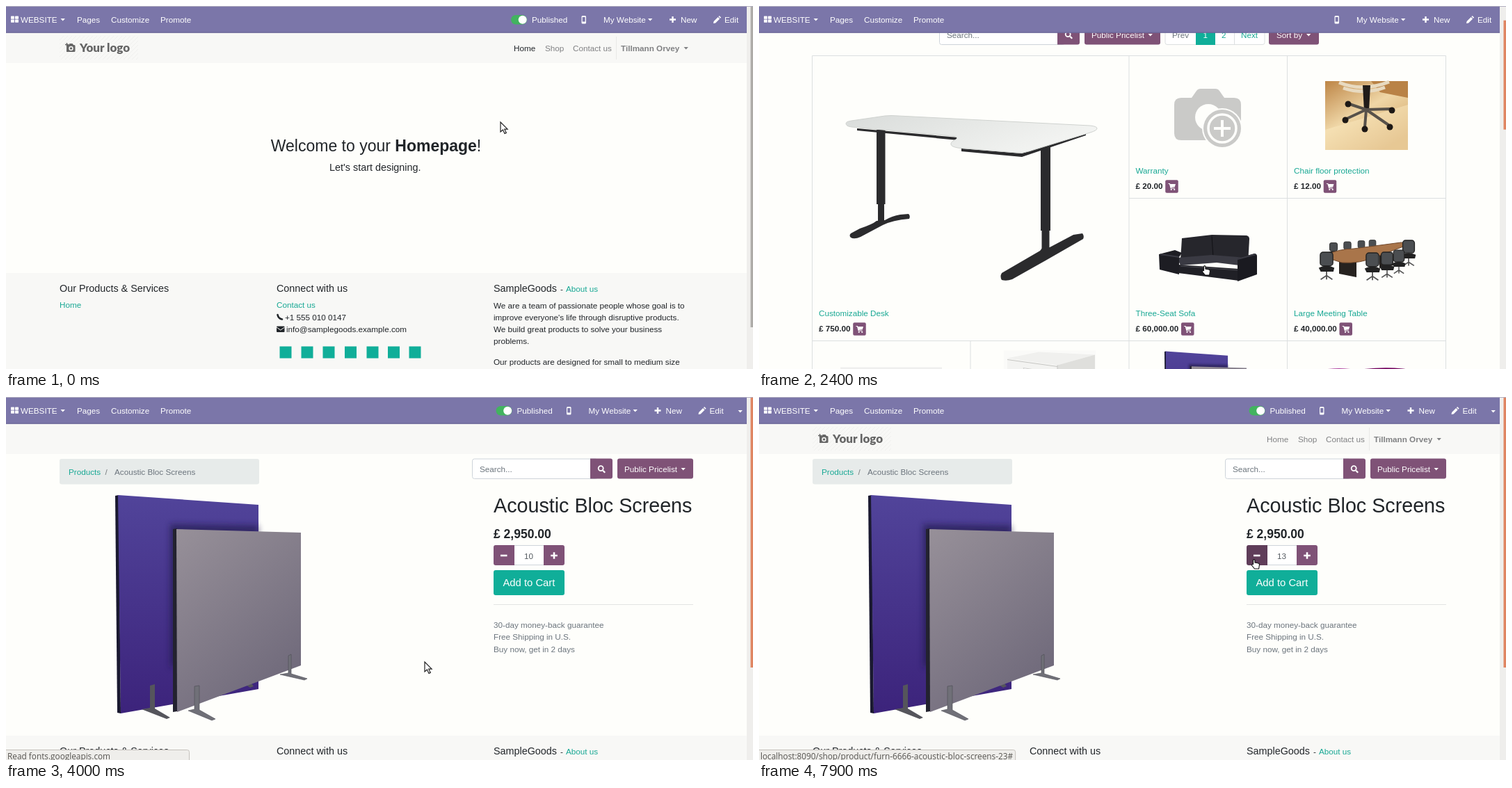
Animation, 1074 px wide and 522 px high, one loop 8000 ms. Source, as an HTML page:

```html
<!DOCTYPE html>
<html lang="en">
<head>
<meta charset="utf-8">
<title>Web shop tour</title>
<style>
html, body { margin: 0; width: 100%; height: 100%; overflow: hidden; background: #fefefb; }
svg { display: block; width: 1074px; height: 522px; }
text { font: 11.7px "Liberation Sans", Arial, sans-serif; white-space: pre; }
</style>
</head>
<body>
<svg id="stage" viewBox="0 0 1074 522"></svg>
<script>
const INK = '#212529', GRAY = '#777b7e', TEAL = '#10ae99', LINK = '#18a894', PLUM = '#7f5277', PALE = '#f8f8f6',
      PAPER = '#fefefb', LINE = '#dcdfe0', NAVY = '#7b76a9', DARK = '#2b2b2d';

// drawing helpers: each returns markup
const path = (d, fill, more = '') => `<path d="${d}" fill="${fill}" ${more}/>`;
const line = (d, stroke, w = 1, more = '') => path(d, 'none', `stroke="${stroke}" stroke-width="${w}" ${more}`);
const rect = (x, y, w, h, fill, r = 0, stroke = 'none') =>
  `<rect x="${x}" y="${y}" width="${w}" height="${h}" rx="${r}" fill="${fill}" stroke="${stroke}"/>`;
const dot = (x, y, r, fill, more = '') => `<circle cx="${x}" cy="${y}" r="${r}" fill="${fill}" ${more}/>`;
const text = (x, y, s, fill = INK, size = 11.7, more = '') =>
  `<text x="${x}" y="${y}" fill="${fill}" style="font-size:${size}px;${more}">${s}</text>`;
const bold = (x, y, s, fill = INK, size = 11.7) => text(x, y, s, fill, size, 'font-weight:bold');
const group = (id, inner, more = '') => `<g id="${id}" ${more}>${inner}</g>`;
const shift = (x, y, inner, k = 1) => `<g transform="translate(${x} ${y}) scale(${k})">${inner}</g>`;
const caret = (x, y, fill = '#fff') => path(`M${x} ${y}h6.4l-3.2 3.4z`, fill);
const plus = (x, y, r = 4.5, w = 2.4) => line(`M${x - r} ${y}h${2 * r}M${x} ${y - r}v${2 * r}`, '#fff', w);

const defs = `<defs>
  <linearGradient id="violet" x2="0" y2="1"><stop stop-color="#51449a"/><stop offset="1" stop-color="#3c237b"/></linearGradient>
  <linearGradient id="ash" x2=".6" y2="1"><stop stop-color="#979099"/><stop offset="1" stop-color="#706a7b"/></linearGradient>
  <linearGradient id="floor" x2=".7" y2="1"><stop stop-color="#bd8546"/><stop offset=".5" stop-color="#efd6a6"/><stop offset="1" stop-color="#d3a769"/></linearGradient>
  <linearGradient id="top" x2="1" y2=".4"><stop stop-color="#d9dcda"/><stop offset="1" stop-color="#f3f4f2"/></linearGradient>
  <pattern id="hatch" width="6" height="6" patternUnits="userSpaceOnUse"><path d="M-1 7L7-1" stroke="#f0f0ee"/></pattern>
  <filter id="soft"><feGaussianBlur stdDeviation="4"/></filter></defs>`;

// top bar
const tools =
  rect(827.5, 14, 6.5, 11.5, '#fff', 1.5) + rect(828.7, 16, 4, 6.5, NAVY) +
  text(859, 24, 'My Website', '#fff') + caret(923, 18) + plus(958.5, 19.5) + text(970, 24, 'New', '#fff') +
  path('M1017 25l.6-3 6-6 2.5 2.5-6 6zM1024.4 15.2l1.2-1.2 2.5 2.5-1.2 1.2z', '#fff') +
  text(1033, 24, 'Edit', '#fff') + caret(1074, 19);
const bar = rect(0, 0, 1065, 38.5, NAVY) + rect(0, 0, 1074, 1, '#b3b0c2') + rect(0, 37.5, 1065, 1.2, '#6a6598') +
  [[7, 14.5], [13, 14.5], [7, 19.5], [13, 19.5]].map(([x, y]) => rect(x, y, 5, 4.2, '#fff', .6)).join('') +
  text(21, 24, 'WEBSITE', '#fff') + caret(78.5, 18) + text(102, 24, 'Pages', '#fff') +
  text(151, 24, 'Customize', '#fff') + text(222, 24, 'Promote', '#fff') +
  `<svg width="1065" height="39">${group('tools', tools + group('live',
    rect(726, 13, 23, 13.5, '#42b35f', 6.7) + dot(742.7, 19.7, 6, '#fff') + text(756, 24, 'Published', '#fff')))}</svg>`;

const camera = path('M87 56h3l1.5-2h4l1.5 2h1q1.5 0 1.5 1.5v7q0 1.5-1.5 1.5h-11z', '#666') +
  dot(93.5, 61, 3.2, PALE) + dot(93.5, 61, 1.7, '#666') + line('M85 55.5h5M87.5 53v5', '#666', 1.3);
const header = (id, active) => {
  const item = (x, s) => text(x, 65, s, s === active ? INK : '#808183');
  return rect(0, 38, 1065, 44, PALE) + group(id,
    rect(77, 43, 113, 34, 'url(#hatch)') + camera +
    text(106, 66, 'Your logo', '#666', 17, 'font-family:Lato,sans-serif;font-weight:900') +
    line('M877.5 44v33', '#e9e9e7') +
    group(id + 'Menu', item(730, 'Home') + item(775, 'Shop') + item(815, 'Contact us') +
      bold(884, 65, 'Tillmann Orvey', '#808183') + caret(974.5, 59, '#808183')));
};

const footer = rect(0, 384, 1065, 330, PALE) +
  text(77, 411, 'Our Products &amp; Services', INK, 14.36) + text(77, 434, 'Home', LINK) +
  text(389, 411, 'Connect with us', INK, 14.36) + text(389, 434, 'Contact us', LINK) +
  line('M390.5 444q1 5.5 6.5 6.5', INK, 2.6, 'stroke-linecap="round"') + text(401, 452, '+1 555 010 0147') +
  rect(389, 460.5, 11.5, 8.5, INK, 1) + line('M389 462l5.7 4 5.8-4', PALE) +
  text(403, 469, 'info@samplegoods.example.com') +
  [402, 433, 464, 495.5, 527, 557.5, 588].map(x => rect(x - 8.5, 489.5, 17, 17, TEAL)).join('') +
  text(701, 411, 'SampleGoods', INK, 14.36) + text(797, 411, '-') + text(805, 411, 'About us', LINK) +
  ['We are a team of passionate people whose goal is to', 'improve everyone\'s life through disruptive products.',
   'We build great products to solve your business', 'problems.'].map((s, i) => text(701, 434.5 + i * 17.25, s)).join('') +
  text(701, 516, 'Our products are designed for small to medium size');

const home = header('homeNav', 'Home') +
  `<text x="532" y="209" text-anchor="middle" fill="${INK}" style="font-size:23px">Welcome to your <tspan font-weight="bold">Homepage</tspan>!</text>` +
  text(465, 237, 'Let\'s start designing.', INK, 14.4) + footer;

// search box with price list button, shared by two pages
const search = rect(259.5, 89, 180, 28.5, '#fff', 3, '#ced4da') + text(270, 107.5, 'Search...', '#6c757d') +
  path('M429 88.5h29q3 0 3 3v23q0 3-3 3h-29z', PLUM) +
  line('M447.2 105.7l3 3', '#fff', 2.2) + dot(444.2, 102.6, 3.5, 'none', 'stroke="#fff" stroke-width="1.8"') +
  rect(468, 88.5, 109, 29, PLUM, 3) + text(478, 107.5, 'Public Pricelist', '#fff') + caret(559.5, 102);

// pictures
const chair = (x, y, k = 1) => shift(x, y, line('M0 7v8M-6 18l6-4 6 4M0 14v4', '#555', 1.3) +
  rect(-6.5, -10, 13, 14, '#4b4e51', 3, '#222') + path('M-8 6q8-4 16 0l-1 4h-13z', '#222'), k);
const chairs = list => list.map(p => chair(...p)).join('');

const desk = path('M141 238l145 13v4l-145-14zM291 267l87 7 92-30v4l-92 31-87-8z', DARK) +
  path('M169 240h12.5v107h-1.5v26h-9v-26h-2zM405 265h14v120h-1.5v28h-11v-28h-1.500z', DARK) +
  path('M132 389l13-7q18-6 24-11l12-1q10-6 22-8l12-1q3 3 1 7-24 2-38 9l-32 17q-9 4-14 1-3-3 0-6z', DARK) +
  path('M349 446l55-32 4-5h10l34-18 13-2q3 4 1 8l-54 31-48 27q-8 3-15 1-3-5 0-10z', DARK) +
  path('M125 231q0-3 8-4l48-7q8-1 20 0l275 14q10 1 10 4t-10 6l-88 27q-8 3-18 2l-84-7q-11-2-10-6 0-3 7-6 5-4-5-5l-145-13q-8-1-8-5z', 'url(#top)', 'stroke="#cfd2cf"');

const warranty = path('M607 194h15l7-10q2-3 6-3h21q4 0 6 3l7 10h14q10 0 10 10v41q0 10-10 10h-76q-10 0-10-10v-41q0-10 10-10z', '#cacac8') +
  dot(646, 222, 19, PAPER) + dot(666, 238, 29, PAPER) + dot(666, 238, 27, '#cacac8') +
  dot(666, 238, 20, 'none', 'stroke="#fefefb" stroke-width="3.5"') + line('M654 238h24M666 226v24', PAPER, 4);

const mat = rect(814, 170, 119, 99, 'url(#floor)') + path('M814 240l119-36v65h-119z', '#fbe9c0', 'opacity=".5"') +
  path('M880 170h53v24l-40-8z', '#b98246') + line('M834 172q34 14 72-1M840 180q30 10 60-1', '#e8dac0', 5) +
  path('M868 176h11l-2 37h-7z', '#211c19') +
  line('M873 211l-28 13M873 211l-2 25M873 211l32 22M873 211l35-1M873 211l-24-8', '#57514a', 4) +
  [[843, 226], [871, 239], [907, 236], [910, 212], [847, 203]].map(([x, y]) => dot(x, y, 4.5, '#1d1815')).join('');

const sofa = path('M608 396l43-5 50 1q4 1 4 5l-2 36-97-6z', '#26262c') + line('M651 393l2 30', '#111115') +
  path('M601 424l50-4 7 11-52 4zM651 420l50 4-10 11-33-4z', '#3a3a43') +
  path('M603 434l87 6v17l-87-11z', '#202026') + line('M606 436l84 6', '#4a4a52') +
  path('M575 419l23-6 10 4-4 6v25l-28-7z', '#1d1d23') + line('M577 419l27 4', '#3a3a43', 2) +
  path('M688 425l24-7q4 0 4 4v26l-28 10z', '#1a1a20') + line('M688 426l26-7', '#3a3a43', 2);

const meeting = chairs([[826, 411, .85], [846, 409, .8], [866, 407, .75], [882, 406, .75]]) +
  path('M834 427h25v25l-25-5zM892 420h20v15l-20 4z', '#26221f') +
  path('M815 420q20-9 40-9l68-9q8 0 6 5l-40 15q-25 11-51 9l-22-7q-3-2-1-4z', '#a9754a', 'stroke="#6f482c"') +
  chairs([[816, 430, 1.4], [934, 412, 1.3], [920, 425, 1.2], [903, 429, 1.3], [882, 431, 1.4]]);

// the pictures below sit in rows three and four
const cubicle = rect(117, 254, 146, 96, '#efefee') + chairs([[183, 270, 1.1], [254, 295, 1.2]]) +
  path('M166 279l26-7 8 5-24 8zM200 277l22-5 20 9-17 8zM147 293l20-8 27 20-26 8z', '#a58a68') +
  path('M165 279l32-11v9l-26 10zM197 267l46 17v10l-46-16zM153 276l41 26v13l-41-26zM194 302l50-15v12l-50 16z', '#a9b0b3') +
  path('M147 293l21 20v4l-21-20zM150 297h3v34h-3zM170 313l24-4v35l-24-6zM200 320h3v22h-3zM241 306h3v28h-3z', '#fdfdfc') +
  path('M183 312l10 1v24l-10-3z', '#7f6650') + path('M195 311l44-12 5 7-26 9-4 8-15-1z', '#a58a68') +
  chairs([[132, 298, 1.4], [209, 319, 1.5]]);

const drawer = rect(352, 230, 132, 145, '#fafaf8') + path('M357 241l45-9 81 4-54 15z', '#f0f0ee') +
  path('M357 241l72 10v112l-72-17z', '#f3f3f1') + path('M429 251l54-15v109l-54 18z', '#dfdfdc') +
  line('M357 276l72 11M357 312l72 14M429 251v112M357 243l72 10', '#c6c6c3') +
  [[380, 255], [380, 291], [380, 326]].map(([x, y]) => path(`M${x} ${y}l26 4q-5 9-13 6-8-1-13-10z`, '#fff', 'stroke="#d0d0ce"')).join('') +
  rect(414, 329, 6, 5, '#444', 2) + [[366, 351], [425, 368], [476, 352]].map(([x, y]) => rect(x - 6.5, y - 5, 13, 11, DARK, 4)).join('');

const panels = path('M157 142l5-1 3 314-5-1z', '#1a1930') + path('M161 141l202 14v265l-198 35z', 'url(#violet)') +
  path('M236 183l127 2v14l-115 2v180l-12 10z', '#1c1744', 'opacity=".6" filter="url(#soft)"') +
  path('M207 415l7-2v35l22 13-5 2-36-14 12-2zM345 414l8-2 3 4-5 2z', '#55555c') +
  path('M240 190l6-1v263l-6 1z', '#23222f') + path('M245 190l179 5v191l-178 67z', 'url(#ash)') +
  path('M271 416l7-1v35l23 13-5 2-34-14 9-2zM406 372l4-2v28l23 7-4 2-35-8 12-2z', '#707078', 'stroke="#4b4b52" stroke-width=".6"');

const booth = path('M803 334l70-10 65 12-22 14-60 3z', '#ecece9') +
  path('M866 257q32-4 60-1 12 1 12 8l-20 6v37l-46-5z', '#740660') + path('M897 274l21 2v30l-21-4z', '#980a82') +
  path('M874 306l30-5 14 6v16l-10 3-34-2z', '#7c8175') + path('M874 304l30-4 13 6-22 8z', '#a2a695') +
  dot(888, 297, 4, '#e5c9c1') + dot(896, 298, 3.5, '#b8425b') +
  path('M918 268q14-6 20-3v72l-20 12z', '#8d0078') +
  path('M803 266q0-8 10-9 25-3 48 1 12 2 12 9v72q-3 9-14 11l-56-17z', '#93007e') +
  line('M850 349q5-30 2-76', '#7a0069', 2);

const standing = path('M119 489l46-5 96 4-42 12-51 3z', '#34353c') + path('M165 467l28-4v46l-28-6zM193 461l24 3v34l-24 7z', '#25262d') +
  line('M135 496v45M148 500v40M248 492v42M206 502v43', '#34353c', 3);
const cabinet = path('M362 446l21-6 106 7v99H348v-62l14-2z', '#2f2f30') + line('M362 449l126 4M362 470l126 2', '#151515', 2) +
  line('M372 458l90 2v9h-90z', '#48484a') + path('M374 482l72-4v22l-73 8z', '#e8e8e6') + path('M348 482l62-2v40l-62 3z', '#303032');
const oak = line('M588 486v60M700 484v60M637 490v40', '#333438', 4) +
  path('M575 482l43-9 99 6v4l-36 8h-20l-26-5-60 1z', '#c99f62', 'stroke="#9a743f" stroke-width=".8"');
const boss = path('M834 488l20 2q6 1 6 5l-14 2 8 25h-8q-12-24-12-34z', '#222') +
  path('M858 446q1-7 10-7 20-3 38 0 8 1 8 8l-7 50 4 25h-61l6-27z', '#29292a') +
  line('M868 452q20-5 38 0M866 470q20-4 42 0M860 496q22-5 48 1', '#404042');

// product cell caption; width of a price follows from its characters
const cart = (x, y) => rect(x, y, 18.5, 18.5, PLUM, 2) +
  line(`M${x + 4.2} ${y + 5.2}h2l1.8 6.5h5.5`, '#fff', 1.2) +
  path(`M${x + 6.7} ${y + 5.7}h8l-1.2 4.3-6 .8z`, '#fff') + dot(x + 8.5, y + 13.7, 1.1, '#fff') + dot(x + 13, y + 13.7, 1.1, '#fff');
const caption = (x, bottom, name, price) => {
  const w = [...price].reduce((sum, c) => sum + (/[\d£]/.test(c) ? .556 : .278), 0) * 11.7;
  return text(x, bottom - 35.5, name, LINK) + bold(x, bottom - 13.5, price) + cart(x + w + 3.7, bottom - 26.2);
};
const cols = [86, 313.5, 541.5, 769];

const shop = header('shopNav', 'Shop') + search +
  rect(584, 89, 143, 28.5, '#fff', 3, LINE) + rect(628, 88.5, 28, 29.5, TEAL) + line('M683.5 89v28', LINE) +
  text(594, 107.5, 'Prev', '#6c757d') + text(638.5, 107.5, '1', '#fff') + text(665, 107.5, '2', LINK) + text(693, 107.5, 'Next', LINK) +
  rect(733, 88.5, 72, 29, PLUM, 3) + text(744, 107.5, 'Sort by', '#fff') + caret(787, 102) +
  line('M76.5 133.5H987.5M532 338.5H987.5M76.5 543.5H987.5M76.5 749H987.5M76.5 133.5V954M987.5 133.5V954M304 543.5V954M532 133.5V954M759.5 133.5V954', LINE) +
  desk + warranty + mat + sofa + meeting + shift(513.6, 496.2, panels, .442) +
  shift(0, 327.5, cubicle + drawer + booth + standing + cabinet + oak + boss) +
  caption(cols[2], 338.5, 'Warranty', '£ 20.00') + caption(cols[3], 338.5, 'Chair floor protection', '£ 12.00') +
  caption(cols[0], 543.5, 'Customizable Desk', '£ 750.00') + caption(cols[2], 543.5, 'Three-Seat Sofa', '£ 60,000.00') +
  caption(cols[3], 543.5, 'Large Meeting Table', '£ 40,000.00') +
  caption(cols[0], 749, 'Four Person Desk', '£ 23,500.00') + caption(cols[1], 749, 'Drawer', '£ 3,645.00') +
  caption(cols[2], 749, 'Acoustic Bloc Screens', '£ 2,950.00') + caption(cols[3], 749, 'Individual Workplace', '£ 885.00');

const product = header('itemNav') + shift(411, 0, search) +
  rect(77, 89, 287, 36.5, '#e7ebea', 3) + text(90, 111.5, 'Products', LINK) + text(142.5, 111.5, '/', GRAY) +
  text(156, 111.5, 'Acoustic Bloc Screens', '#6c757d') + panels +
  text(701, 166, 'Acoustic Bloc Screens', INK, 28.7) + bold(701, 203, '£ 2,950.00', INK, 17.5) +
  rect(702, 213.5, 100, 28, '#fff', 3, '#ced4da') +
  `<path id="less" d="M731 213h-27q-3 0-3 3v23q0 3 3 3h27z"/><path id="more" d="M773 213h27q3 0 3 3v23q0 3-3 3h-27z"/>` +
  line('M711 228h9.5', '#fff', 2.6) + plus(788, 228, 4.8, 2.6) +
  group('ring', rect(772.5, 212.5, 31.5, 30.5, 'none', 3, '#b5a0b1'), 'stroke-width="2.5"') +
  `<text id="count" x="751.5" y="232.5" text-anchor="middle" fill="#555b61"></text>` +
  rect(701, 249, 102, 36, TEAL, 3) + text(714.5, 272, 'Add to Cart', '#fff', 14.8) + line('M701 298.5h287', '#e3e4e3') +
  ['30-day money-back guarantee', 'Free Shipping in U.S.', 'Buy now, get in 2 days'].map((s, i) => text(701, 332 + i * 17.25, s, '#6c757d')).join('') +
  shift(0, 103, footer);

const stage = document.getElementById('stage');
stage.innerHTML = defs + rect(0, 0, 1074, 522, PAPER) + group('home', home) + group('shop', shop) + group('product', product) +
  bar + rect(1065, 1, 9, 521, '#efeeec') + '<rect id="thumb" x="1070.5" width="3.5"/>' +
  group('status', '<path id="plate" fill="#efeeeb" stroke="#c4c0bb"/>' +
    '<text id="note" x="2" y="521" fill="#55534f" style="font:11.8px \'Open Sans\',sans-serif"></text>') +
  group('arrow', path('M0 0V14l3.4-3 2.6 5.4 2.3-1-2.5-5.2h4.3z', '#fff', 'stroke="#222" stroke-width="1.2"')) +
  group('hand', path('M2.5 7.5V1.5q1.2-1.8 2.4 0V5l5 1q1.7.6 1.6 2.2l-.9 5.8H4.5L.6 9.3q-.5-1.7 1-1.7z', '#fff', 'stroke="#111" stroke-width="1.1"'));
const $ = Object.fromEntries([...stage.querySelectorAll('[id]')].map(e => [e.id, e]));

// timelines
const pointer = [[100, 711, 167], [600, 790, 58], [1000, 790, 58], [1300, 475, 203], [1800, 475, 203], [2300, 637, 373],
  [3600, 637, 373], [4000, 602, 381], [4400, 536, 374], [4900, 640, 330], [5300, 765, 262], [5700, 786, 222],
  [7100, 786, 222], [7400, 745, 250], [7700, 708, 233]];
const wheel = [[2200, 0], [2300, 9], [2400, 62], [2500, 129], [2600, 192], [2700, 245], [2800, 291], [2900, 327.5]];
const hands = [[600, 1100], [2400, 2800], [3300, 3700], [5600, 7200], [7600, 8000]];
const link = 'localhost:8090/shop/product/furn-6666-acoustic-bloc-screens-23';
const notes = [[600, 700, 'localhost:8090/shop'], [700, 800, 'Waiting for localhost...'], [800, 1300, 'Read fonts.googleapis.com'],
  [2800, 3400, link], [3400, 3600, 'Waiting for localhost...'], [3600, 4400, 'Read fonts.googleapis.com'],
  [5700, 7300, link + '#'], [7600, 8000, link + '#']];

const within = (t, [a, b]) => t >= a && t < b;
const ramp = (t, a, b) => Math.max(0, Math.min(1, (t - a) / (b - a)));
function at(keys, t, col) {
  const i = keys.findIndex(k => k[0] > t);
  if (i < 1) return keys.at(i)[col];
  const a = keys[i - 1], b = keys[i];
  return a[col] + (b[col] - a[col]) * ramp(t, a[0], b[0]);
}
const set = (id, attrs) => { for (const k in attrs) $[id].setAttribute(k, attrs[k]); };
const show = (id, on) => set(id, { display: on ? 'inline' : 'none' });

function drawStatus(t) {
  const note = notes.find(n => within(t, n));
  show('status', note);
  if (!note) return;
  const [start, , words] = note;
  $.note.textContent = words;
  const w = Math.max(264, $.note.getComputedTextLength() + 6) - .5;
  set('plate', { d: `M-1 507.5H${w - 3}q3 0 3 3V523H-1z` });
  // fades in unless it follows another message
  const follows = notes.some(n => n[1] === start);
  set('status', { opacity: follows ? 1 : ramp(t, start - 100, start + 200) });
}

function draw(t) {
  const page = t < 800 ? 'home' : t < 3600 ? 'shop' : 'product';
  for (const p of ['home', 'shop', 'product']) show(p, p === page);
  const scroll = at(wheel, t, 1);
  set('shop', { transform: `translate(0 ${-scroll})` });
  set('thumb', page === 'home' ? { y: 1, height: 461, fill: '#aeaca9' }
    : { y: page === 'shop' ? scroll / 3 : 1, height: page === 'shop' ? 157 : 388, fill: '#df8562' });
  set('tools', { transform: `translate(${page === 'product' ? -21.5 : 0} 0)` });
  show('live', page !== 'shop');

  show('shopNav', t >= 1500);
  set('shopNavMenu', { opacity: ramp(t, 1500, 2100) });
  show('itemNav', t >= 4300);
  set('itemNavMenu', { opacity: ramp(t, 4200, 4900) });

  $.count.textContent = 10 + (t >= 6000) + (t >= 6500) + (t >= 6800);
  set('more', { fill: within(t, [5600, 7200]) ? '#5f3d59' : PLUM });
  set('less', { fill: t >= 7600 ? '#5f3d59' : PLUM });
  show('ring', within(t, [5900, 7300]));

  drawStatus(t);

  const hand = hands.some(h => within(t, h));
  show('hand', hand);
  show('arrow', !hand);
  set(hand ? 'hand' : 'arrow', { transform: `translate(${at(pointer, t, 1)} ${at(pointer, t, 2)})` });
}

function tick() {
  draw(Math.floor(performance.now() % 8000 / 100) * 100);
  requestAnimationFrame(tick);
}
tick();
</script>
</body>
</html>
```
